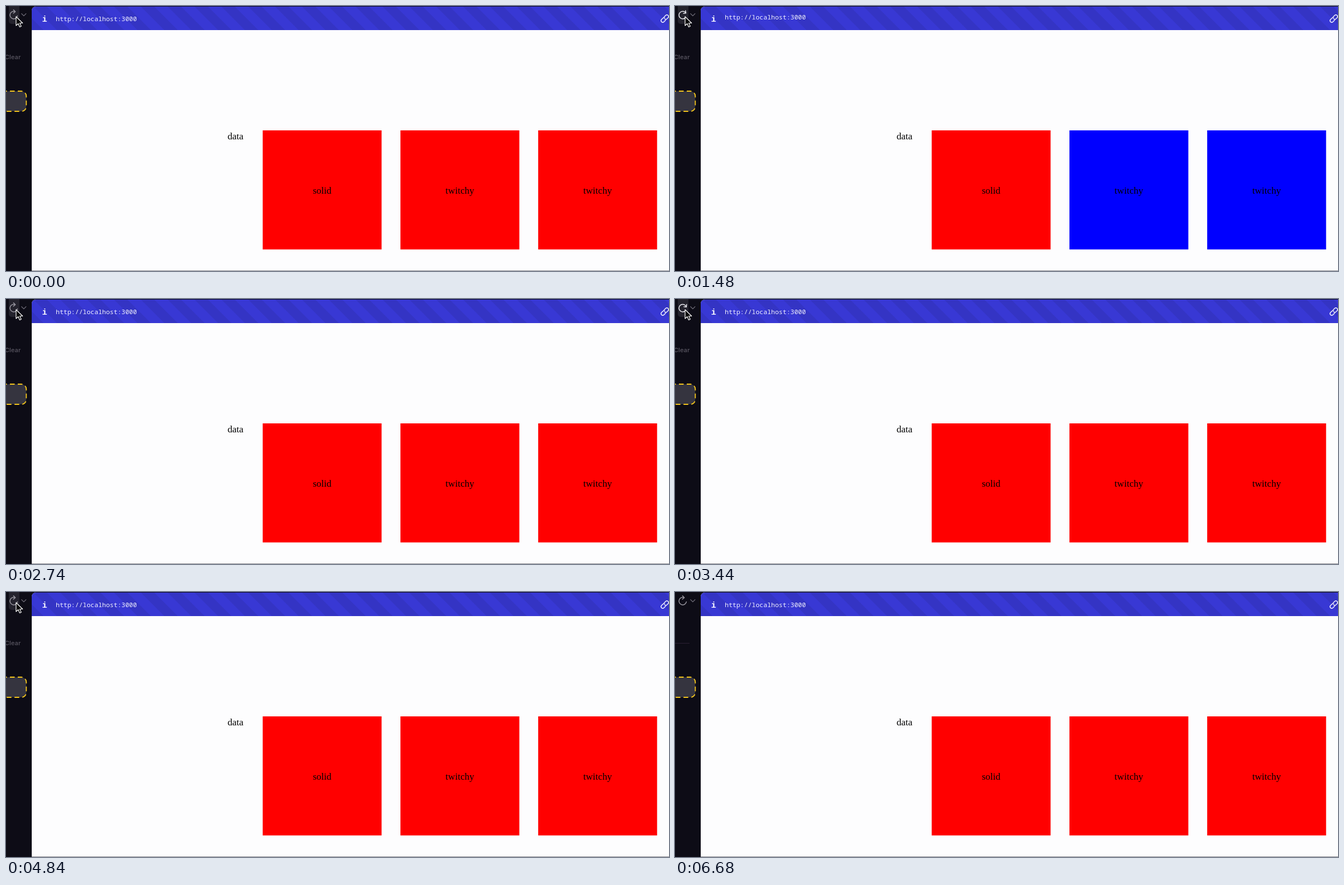
Write an HTML page that moves like this. It is 1185 px wide and 473 px high and loops after 6700 ms.

```html
<!DOCTYPE html>
<html lang="en">
<head>
<meta charset="utf-8">
<title>Reload</title>
<style>
html, body { margin: 0; width: 100%; height: 100%; overflow: hidden; background: #0d0c16; }
svg { display: block; width: 1185px; height: 473px; }
.serif { font: 17.07px "Liberation Serif", "Times New Roman", serif; }
.mono { font: 11.5px "Noto Sans Mono", monospace; fill: #f1f1ff; }
.info { font: bold 15px "Liberation Mono", monospace; fill: #fff; }
.clear { font: 600 11px Inter, sans-serif; fill: #504e59; }
.line { fill: none; stroke-linecap: round; stroke-linejoin: round; }
</style>
</head>
<body>
<svg viewBox="0 0 1185 473">
  <defs>
    <pattern id="stripes" width="48" height="48" patternUnits="userSpaceOnUse">
      <rect width="48" height="48" fill="#3838d4"/>
      <path d="M0 0H24L48 24V48ZM0 24L24 48H0Z" fill="#3434c4"/>
    </pattern>
  </defs>
  <rect width="1185" height="473" fill="#0d0c16"/>

  <rect id="hover" x="5" y="-6" width="19" height="38" rx="5" fill="#24232d"/>
  <g id="reload" class="line" stroke-width="1.5">
    <path d="M6.6 1.2A6.7 6.7 0 1 1 2.4 -6.25"/>
    <path d="M-.4 -9.4L2.8 -6.1L-.6 -3.2"/>
  </g>
  <path class="line" d="M27.8 13.7L31.8 17.7L35.8 13.7" stroke="#777580" stroke-width="1.2"/>
  <text id="clear" class="clear" x="-2" y="95">Clear</text>
  <path id="rule" d="M0 91.5H26" stroke="#2b1f33"/>
  <rect x="-30" y="152" width="66.3" height="36" rx="9" fill="#35343f" stroke="#f3c51c" stroke-width="1.8" stroke-dasharray="8.5 5.5"/>

  <path d="M46 473V9Q46 1 54 1H1185V473Z" fill="#fdfdfe"/>
  <path d="M46 43V9Q46 1 54 1H1185V43Z" fill="url(#stripes)"/>
  <rect x="46" y="472" width="1139" height="1" fill="#8b8b90"/>
  <text class="info" x="64.5" y="28">i</text>
  <text id="url" class="mono" x="89" y="27">http://localhost:3000</text>
  <g class="line" transform="translate(1177.5 22.5) rotate(-45)" stroke="#f4f4ff" stroke-width="1.4">
    <path d="M1 -3H5.2A3 3 0 0 1 5.2 3H2.3A3 3 0 0 1 -.6 .7"/>
    <path d="M-1 3H-5.2A3 3 0 0 1 -5.2 -3H-2.3A3 3 0 0 1 .6 -.7"/>
  </g>

  <text class="serif" x="396" y="238">data</text>
  <g id="boxes" class="serif" text-anchor="middle"></g>

  <path id="arrow" d="M0 0V16L3.8 12.5L6.5 18.5L9.2 17.3L6.6 11.5H11.7Z" fill="#050505" stroke="#fff" stroke-width="1.2" stroke-linejoin="round"/>
  <path id="resize" d="M0 -6L3.5 -2H1.2V3H3.5V5.5H-3.5V3H-1.2V-2H-3.5Z" fill="#111" stroke="#fff" stroke-width="1.1"/>
</svg>
<script>
const LOOP = 6700;
const CLICKS = [650, 1340, 2020, 3020, 3960];
const SPIN = [[80, 0], [170, 50], [200, 110], [420, 410], [560, 360]];
const LIFT = [[0, 0], [80, -5.8], [170, -1], [200, 0]];
const MOVE_X = [[5000, 18], [5300, 520], [5600, 1131]];
const MOVE_Y = [[5000, 19], [5300, 24], [5600, 6]];
const FADE = [[5000, 1], [5180, 0]];

const $ = id => document.getElementById(id);
const show = (el, on) => el.setAttribute("visibility", on ? "visible" : "hidden");

function track(keys, t) {
  if (t <= keys[0][0]) return keys[0][1];
  for (let i = 1; i < keys.length; i++) {
    const [a, from] = keys[i - 1], [b, to] = keys[i];
    if (t <= b) return from + (to - from) * (t - a) / (b - a);
  }
  return keys[keys.length - 1][1];
}

$("boxes").innerHTML = ["solid", "twitchy", "twitchy"].map((label, i) => {
  const x = 458.8 + i * 246.2;
  return `<rect x="${x}" y="222" width="212.5" height="212.5" fill="#f00"/>` +
    `<text x="${x + 106.2}" y="335">${label}</text>`;
}).join("");
const twitchy = [...$("boxes").querySelectorAll("rect")].slice(1);

function draw(t) {
  const click = CLICKS.filter(c => c <= t).pop();
  const age = click === undefined ? 0 : t - click;
  const blue = age >= 100 && age < 215;
  twitchy.forEach(box => box.setAttribute("fill", blue ? "#00f" : "#f00"));

  $("url").setAttribute("transform", `translate(0 ${track(LIFT, age)})`);
  $("reload").setAttribute("transform", `translate(13.8 16.2) rotate(${track(SPIN, age)})`);
  $("reload").setAttribute("stroke", age > 140 && age < 480 ? "#e8e8ee" : "#98969f");

  const fade = track(FADE, t);
  $("clear").setAttribute("opacity", fade);
  $("hover").setAttribute("opacity", fade);
  show($("rule"), fade === 0);

  const spot = `translate(${track(MOVE_X, t)} ${track(MOVE_Y, t)})`;
  $("arrow").setAttribute("transform", spot);
  $("resize").setAttribute("transform", spot);
  show($("arrow"), t < 5600);
  show($("resize"), t >= 5600 && t < 5850);
}

const start = performance.now();
function frame() {
  draw((performance.now() - start) % LOOP);
  requestAnimationFrame(frame);
}
frame();
</script>
</body>
</html>
```
